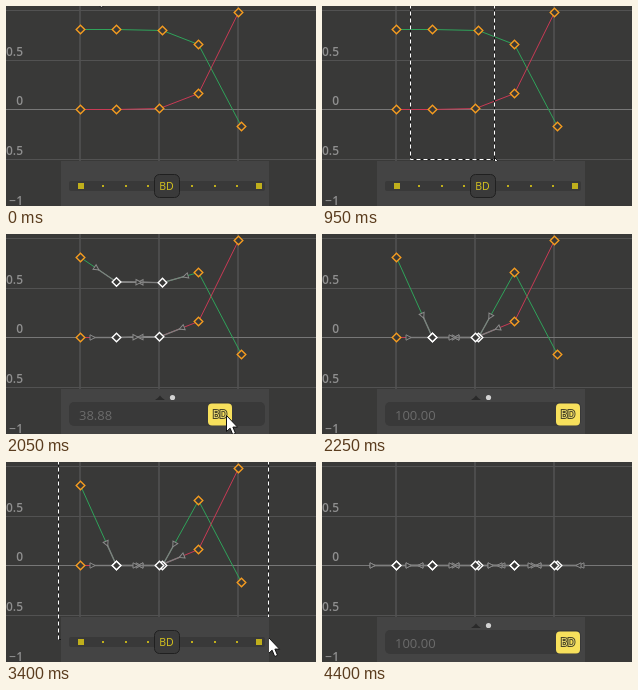
These frames come from a looping animation (310x200 px, 4650 ms). An HTML page:

```html
<!DOCTYPE html>
<html lang="en">
<head>
<meta charset="utf-8">
<title>Blend to default</title>
<style>
html, body { margin: 0; width: 100%; height: 100%; overflow: hidden; background: #393938; }
svg { display: block; width: 100%; height: 100%; }
text { font-family: "Open Sans", "Noto Sans", sans-serif; }
.axis text { font-size: 12px; font-weight: 600; fill: #8f8f8f; text-anchor: end; }
.bd { font-size: 10.5px; text-anchor: middle; }
</style>
</head>
<body>
<svg viewBox="0 0 310 200">
  <defs>
    <path id="arrow" d="M0 0V16L3.6 12.7L6.2 19L9 17.8L6.4 11.6H11Z" fill="#fff" stroke="#111" stroke-linejoin="round"/>
  </defs>
  <rect width="310" height="200" fill="#393938"/>
  <path d="M74 0V200M153 0V200M232 0V200" stroke="#4c4c4c" stroke-width="2"/>
  <path d="M0 4.5H310M0 54.5H310M0 153.5H310" stroke="#525252"/>
  <path d="M0 103.5H310" stroke="#777"/>
  <g class="axis">
    <text x="17" y="49.5">0.5</text>
    <text x="17" y="98.5">0</text>
    <text x="17" y="148.5">-0.5</text>
    <text x="17" y="198.5">−1</text>
  </g>
  <g id="plot" transform="translate(0.5 0.5)"></g>
  <g id="marquee" fill="none">
    <path stroke="#161616"/>
    <path stroke="#fff" stroke-dasharray="4 3"/>
  </g>
  <use id="under" href="#arrow"/>
  <rect x="55" y="155" width="208" height="45" fill="#444"/>
  <g id="idle">
    <rect x="63" y="175" width="196" height="10" rx="2" fill="#393939"/>
    <path id="dots" fill="#c0af1c"/>
    <rect x="148.5" y="168.5" width="25" height="23" rx="5" fill="#3a3a3a" stroke="#202020"/>
    <text class="bd" x="160.5" y="183.5" fill="#d8c51e">BD</text>
  </g>
  <g id="drag">
    <path d="M149 166Q151.5 165 154 161.5Q156.5 165 159 166Z" fill="#2a2a2a"/>
    <circle cx="166.5" cy="163.5" r="2.6" fill="#d2d2d2"/>
    <rect x="63" y="168" width="196" height="24" rx="5" fill="#393939"/>
    <text id="value" x="73" y="186" font-size="13" fill="#6b6b6b"></text>
    <g id="button">
      <rect x="-12" y="169.5" width="24" height="22" rx="4" fill="#f7e05c"/>
      <text class="bd" y="184" fill="#fbe978" stroke="#4a4528" stroke-width="2" paint-order="stroke">BD</text>
    </g>
  </g>
  <use id="over" href="#arrow"/>
</svg>
<script>
const LOOP = 4650, STEP = 50, ZERO = 103, ARM = 24;
const HOME = 161, REACH = 85, DRAG_TIME = 480;
const PICK = 1150, PICK_ALL = 3450;
const el = id => document.getElementById(id);
const plot = el('plot');

const curves = [
  { color: '#2fa35a', keys: [[74, 23], [110, 23], [156, 24], [192, 38], [235, 120]] },
  { color: '#c93a55', keys: [[74, ZERO], [110, ZERO], [153, ZERO - 1], [192, 87], [232, 6]] }
];

// pointer stops: time, x, y
const stops = [
  [100, 88, -18], [200, 88, -23], [450, 88, -18], [950, 172, 151], [PICK, 172, 151],
  [1650, 167, 181], [2600, 155, 165], [2850, 88, -25], [3100, 52, -18],
  [3400, 262, 175], [PICK_ALL, 262, 175], [3850, 163, 179]
];
const boxes = [
  { from: 450, to: PICK, x: 88, y: -16 },
  { from: 3100, to: PICK_ALL, x: 52, y: -16 }
];
const drags = [
  { from: 1750, hide: 2250, to: 2600, lag: 35, grip: 6, y: 181 },
  { from: 3900, hide: 4400, to: LOOP, lag: 0, grip: 2, y: 179 }
];

const clamp = v => Math.min(1, Math.max(0, v));
const ease = k => k * k * (3 - 2 * k);
const inside = (span, t) => t >= span.from && t < span.to;

function pointerAt(t) {
  const i = stops.findIndex(s => s[0] > t);
  if (i < 1) return stops.at(i).slice(1);
  const [t0, x0, y0] = stops[i - 1], [t1, x1, y1] = stops[i];
  const k = ease((t - t0) / (t1 - t0));
  return [x0 + (x1 - x0) * k, y0 + (y1 - y0) * k];
}

const travel = (drag, t) => Math.round(REACH * clamp((t - drag.from) / DRAG_TIME));
const share = d => (d / REACH) ** 2;
const blend = (drag, t) => t >= drag.hide ? 1 : share(travel(drag, t - drag.lag));

const line = (a, b, color, width = 1) =>
  `<path d="M${a}L${b}" stroke="${color}" stroke-width="${width}"/>`;

function handle(key, next) {
  const dx = next[0] - key[0], dy = next[1] - key[1], k = ARM / Math.hypot(dx, dy);
  const end = [key[0] + dx * k, key[1] + dy * k];
  const turn = Math.atan2(-dy, -dx) * 180 / Math.PI;
  return line(key, end, '#7f7f7f', 1.4) +
    `<path d="M-2.5 -2.7L2.7 0L-2.5 2.7Z" transform="translate(${end}) rotate(${turn})" fill="#393938" stroke="#8a8a8a"/>`;
}

function drawPlot(t) {
  const [inner, all] = drags.map(d => blend(d, t));
  const middle = i => i === 1 || i === 2;
  const picked = i => t >= PICK_ALL || (t >= PICK && middle(i));
  let lines = '', arms = '', marks = '';
  for (const { color, keys } of curves) {
    const pts = keys.map(([x, y], i) =>
      [x, ZERO + (y - ZERO) * (1 - all) * (middle(i) ? 1 - inner : 1)]);
    pts.forEach((p, i) => {
      const on = picked(i);
      if (i) lines += line(pts[i - 1], p, on && picked(i - 1) ? '#f2f2f2' : color);
      if (on) {
        arms += handle(p, pts[i - 1] || [p[0] - 1, p[1]]);
        arms += handle(p, pts[i + 1] || [p[0] + 1, p[1]]);
      }
      marks += `<path d="M0 -4.3L4.3 0L0 4.3L-4.3 0Z" transform="translate(${p})" fill="#393938" ` +
        `stroke="${on ? '#fff' : '#f59c20'}" stroke-width="1.4"/>`;
    });
  }
  plot.innerHTML = lines + arms + marks;
}

const show = (node, on) => node.setAttribute('visibility', on ? 'visible' : 'hidden');

function render(t) {
  drawPlot(t);
  const drag = drags.find(d => inside(d, t));
  const box = boxes.find(b => inside(b, t));
  let [x, y] = pointerAt(t);

  show(el('idle'), !drag);
  show(el('drag'), drag);
  if (drag) {
    const d = travel(drag, t);
    el('value').textContent = (share(d) * 100).toFixed(2);
    el('button').setAttribute('transform', `translate(${HOME + d})`);
    x = HOME + d + drag.grip;
    y = drag.y;
  }

  show(el('marquee'), box);
  if (box) {
    const l = box.x + 0.5, top = box.y + 0.5;
    const r = Math.round(x) + 0.5, b = Math.round(y) + 2.5;
    for (const p of el('marquee').children)
      p.setAttribute('d', `M${l} ${top}V${b}H${r}M${r} ${top}V${b}M${l} ${top}H${r}`);
  }

  // the panel covers the pointer while it selects
  const below = Boolean(box) || t < PICK, hidden = drag && t >= drag.hide;
  for (const id of ['under', 'over']) {
    el(id).setAttribute('transform', `translate(${x + 0.5} ${y + 0.5})`);
    show(el(id), !hidden && (id === 'under') === below);
  }
}

// nine evenly spaced ticks, large at both ends, none in the middle
let ticks = '';
for (let i = 0; i < 9; i++) {
  if (i === 4) continue;
  const r = i % 8 ? 1 : 3, x = Math.round(75 + 22.25 * i);
  ticks += `M${x - r} ${180 - r}h${2 * r}v${2 * r}h${-2 * r}z`;
}
el('dots').setAttribute('d', ticks);

const start = performance.now();
let last = -1;
function tick(now) {
  const t = Math.floor((Math.max(0, now - start) % LOOP) / STEP) * STEP;
  if (t !== last) render(last = t);
  requestAnimationFrame(tick);
}
render(0);
requestAnimationFrame(tick);
</script>
</body>
</html>
```
